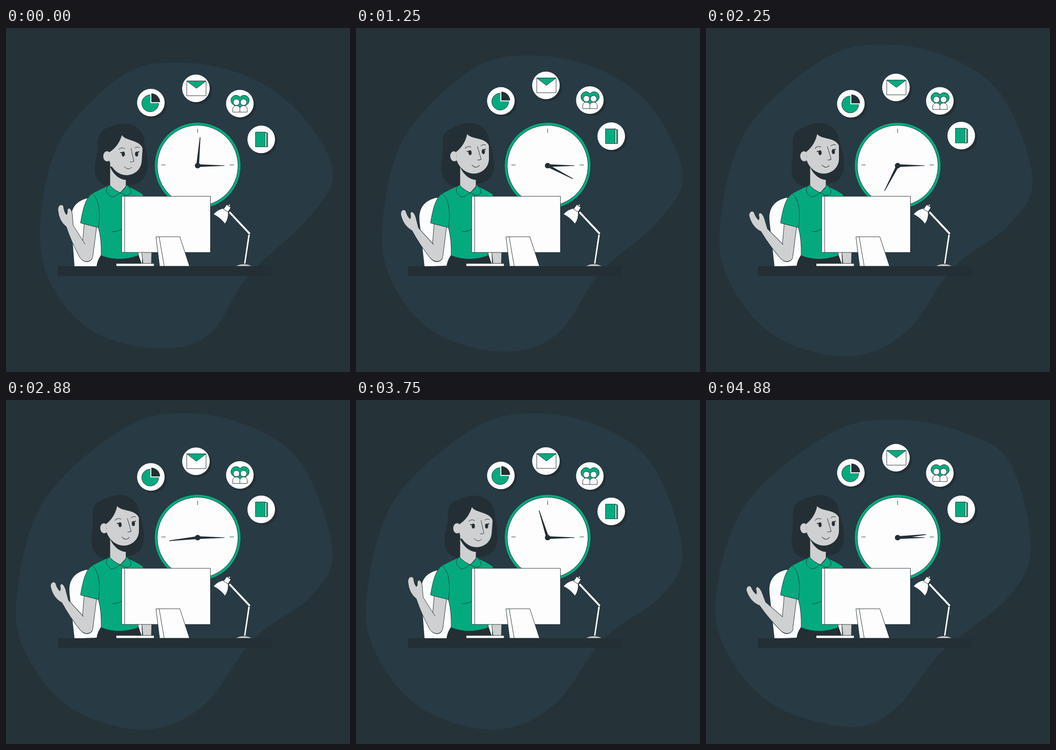
These frames come from a looping animation (748x748 px, 5.01 s). An HTML page:

```html
<!DOCTYPE html>
<html lang="en">
<head>
<meta charset="utf-8">
<title>Working day</title>
<style>
  html, body { margin: 0; width: 100%; height: 100%; overflow: hidden; background: #253237; }
  svg { display: block; width: 100%; height: 100%; }
  .line { fill: none; stroke: #263238; stroke-linecap: round; stroke-linejoin: round; }
  .green, .white, .skin { stroke: #263238; stroke-linejoin: round; }
  .green { fill: #04aa7e; }
  .white { fill: #fdfdfe; }
  .skin { fill: #cfd0d1; }
  .bare { stroke: none; }
  .dark { fill: #232f35; }
  .gap { stroke: #fdfdfe; stroke-width: 4; paint-order: stroke; }
</style>
</head>
<body>
<svg viewBox="0 0 748 748">
  <rect width="748" height="748" fill="#253237"/>
  <path id="blob" fill="#283a44"/>
  <g id="icons"></g>

  <g id="clock" transform="translate(416.700 299.300)">
    <circle class="green" r="93.800"/>
    <circle class="white" r="87.800"/>
    <path class="dark" d="M0 -3L58.500 -.5V.5L0 3Z"/>
    <path class="dark" id="minute" d="M-3 0L-.7 -62H.7L3 0Z"/>
    <circle class="dark" r="6"/>
  </g>

  <path class="white bare" id="chair" d="M149 518L142 425C139 397 148 377 178 370H250L296 480V518Z"/>
  <path class="dark" id="hair" d="M258 208C285 208 303 230 301 250C312 290 314 336 275 341L225 345C182 335 192 300 200 262C198 235 205 221 222 217Q240 208 258 208Z"/>

  <g id="body">
    <path class="dark" d="M207 493Q198 506 197 518H297L287 490Z"/>
    <path class="skin" d="M295 485H317L316 514H298Z"/>
    <path class="skin" d="M226 290V346L248 359L261 346V300Z"/>
    <path class="dark" d="M226 301C232 317 247 331 262 330V305Z"/>
    <path class="green" d="M187 360Q205 350 222 343L248 359L262 343Q286 353 298 362V370L287 495Q245 510 207 495Q208 460 201 434Z"/>
    <path class="green" d="M225 341C216 347 214 358 230 368Q240 366 248 358Q234 352 225 341ZM262 341C269 345 281 363 260 364L248 358Q259 351 262 341Z"/>
    <path class="line" d="M231 443Q243 443 252 437"/>
    <path class="skin" d="M170 426L166 472C160 485 158 502 170 507C180 511 188 505 189 495L197 432Z"/>
    <path class="skin" id="forearm" d="M172 470L146 429Q145 416 144 404C143 397 140 391 136 392C131 395 136 402 131 406Q126 399 125 388C122 381 112 385 113 396Q115 420 131 432Q142 465 160 498C168 510 181 511 187 501"/>
    <path class="green" d="M187 360C174 370 168 388 162 424L201 434C206 405 203 372 187 360Z"/>
  </g>

  <g id="face">
    <path class="skin bare" d="M252 233C260 246 291 243 297 262L295 290C293 311 276 320 262 320C244 320 229 305 225 289V270Q245 257 252 233Z"/>
    <path class="skin" d="M225 270C219 264 211 270 211 279C211 288 218 293 225 289"/>
    <ellipse class="dark" cx="255" cy="274" rx="3.500" ry="5.500"/>
    <ellipse class="dark" cx="284" cy="274" rx="3.500" ry="5.500"/>
    <path class="line" stroke-width="2" d="M249 271H254M285 271L289 269"/>
    <path class="line" d="M245 264Q250 258 258 262M280 261Q285 257 290 260M272 262L278 290Q274 292 270 291M257 301Q265 311 273 303"/>
  </g>

  <g id="desk">
    <path class="white" d="M239.500 512H322V518H239.500Z"/>
    <path class="white" d="M251.500 366H444.500V488H251.500ZM258 366V488"/>
    <path class="white" d="M326 454H378L399 518H334ZM333 454L344 518"/>
    <path class="skin" d="M498 518Q517 508 536 518Z"/>
    <path class="white" d="M517 513L526.500 448H531L521 513Z"/>
    <path class="white" d="M484 402L487 398L532 446L529 450Z"/>
    <path class="white" d="M451 405Q460 394 474 392L483 399Q485 414 476 426Q467 413 451 405Z"/>
    <path class="white" d="M480 384L489 390L483 400L473 394ZM483 386L485 383L488 385L486 388Z"/>
    <rect class="dark" x="113" y="518" width="465" height="21"/>
  </g>
</svg>
<script>
  const LOOP = 5010, STEP = 125, LAST_STEP = 39, CYCLE = 4000;
  const byId = id => document.getElementById(id);
  const path = (cls, d) => `<path class="${cls}" d="${d}"/>`;
  const circle = (cls, r, x = 0, y = 0) => `<circle class="${cls}" r="${r}" cx="${x}" cy="${y}"/>`;
  const rotate = (id, angle, x = 0, y = 0) =>
    byId(id).setAttribute('transform', `rotate(${angle} ${x} ${y})`);

  const person = x => path('white', `M${x - 8} 18.500v-6.500c0 -10 16 -10 16 0v6.500Z`)
                    + circle('white', 6.800, x, -3);
  const icons = [
    { x: 315, y: 162.7, art: circle('green', 18.300, -1.500, 1.500)
        + path('dark gap', 'M1 -1V-20A19 19 0 0 1 20 -1Z') },
    { x: 413, y: 129.4, art: path('white', 'M-20 -16H22V16H-20Z')
        + path('green', 'M-20 -16H22L1 0Z') },
    { x: 508.5, y: 160.8, art: path('green', 'M.5 -14A11 11 0 1 0 -17 0L.5 14L18 0A11 11 0 1 0 .5 -14Z')
        + person(-7.5) + person(8) },
    { x: 555, y: 237.8, art: path('green', 'M8 -16L14 -14V16H8Z')
        + path('white', 'M8 -16L11.500 -14V16H8Z')
        + path('green', 'M-12.500 -16H8.500V16H-12.500Z') }
  ];
  byId('icons').innerHTML = icons.map(({ art }) =>
    `<g>${circle('dark', 30, 5, 4.5)}${circle('white bare', 30)}${art}</g>`).join('');
  const badges = [...byId('icons').children];

  for (const angle of [-90, 0, 180]) {
    byId('minute').insertAdjacentHTML('beforebegin',
      `<path class="line" d="M70 0H78.500" transform="translate(0 -1.500) rotate(${angle})"/>`);
  }

  // Key points of the backdrop, clockwise from its top, in three poses.
  const poses = [
    '380,75 530,107 645,192 711,318 648,424 526,539 443,665 335,697 195,663 105,570 74,445 115,250 252,104',
    '405,29 552,67 650,150 710,330 662,428 540,518 432,662 306,717 153,677 56,575 22,445 80,223 257,61',
    '413,43 565,72 662,138 706,318 658,428 512,548 414,669 318,711 157,669 56,567 21,437 84,230 268,74'
  ].map(text => text.split(' ').map(pair => pair.split(',').map(Number)));

  function ease(t, from, to) {
    const x = Math.min(1, Math.max(0, (t - from) / (to - from)));
    return x * x * (3 - 2 * x);
  }

  const mix = (a, b, k) => a.map((point, i) => point.map((v, axis) => v + (b[i][axis] - v) * k));

  // Closed Catmull-Rom curve through the points.
  function smooth(points) {
    const at = i => points[(i + points.length) % points.length];
    const handle = (i, sign) =>
      at(i).map((v, axis) => v + sign * (at(i + 1)[axis] - at(i - 1)[axis]) / 6);
    return `M${at(0)}` + points.map((_, i) =>
      `C${handle(i, 1)} ${handle(i + 1, -1)} ${at(i + 1)}`).join('');
  }

  function draw(t) {
    const beat = t % CYCLE;
    const [small, wide, late] = poses;
    const grown = mix(small, wide, ease(t, 200, 2900));
    const settle = Math.max(0, (t - 3400) / 1480) ** 3;
    byId('blob').setAttribute('d', smooth(mix(grown, late, settle)));

    rotate('minute', 5 + t * 360 / CYCLE);

    icons.forEach(({ x, y }, i) => {
      const phase = (t - 2950 - 310 * i) / CYCLE * 2 * Math.PI;
      badges[i].setAttribute('transform', `translate(${x} ${y + 4.6 * Math.cos(phase)})`);
    });

    const lean = ease(beat, 0, 500) - ease(beat, 3050, 3650);
    rotate('hair', -4.5 * lean, 235, 395);
    rotate('face', -4.5 * lean, 215, 362);
    rotate('chair', -2 * lean, 160, 518);

    const wave = ease(beat, 0, 660) - ease(beat, 700, 1900)
               + ease(beat, 1900, 2450) - ease(beat, 2450, 3400);
    rotate('forearm', -17.5 * wave, 175, 490);
  }

  const start = performance.now();
  function tick() {
    const t = (performance.now() - start) % LOOP;
    draw(Math.min(LAST_STEP, Math.floor(t / STEP)) * STEP);
    requestAnimationFrame(tick);
  }
  tick();
</script>
</body>
</html>
```
